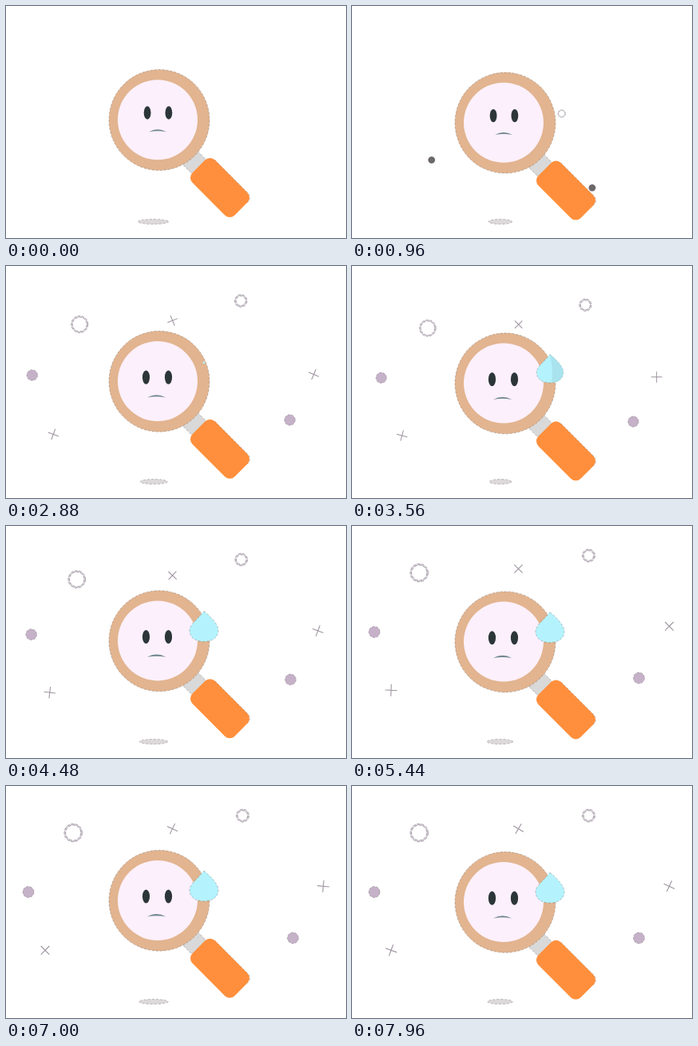
An HTML page for the animation above (8000 ms loop, 426 px wide and 290 px high).

```html
<!DOCTYPE html>
<html lang="en">
<head>
<meta charset="utf-8">
<title>Worried magnifier</title>
<style>
  html, body { margin: 0; width: 100%; height: 100%; overflow: hidden; background: #fff; }
  svg { display: block; width: 426px; height: 290px; }
  .edge { stroke: #4a4446; stroke-width: .5; stroke-opacity: .6; stroke-dasharray: 3 2; }
  .ring { fill: none; stroke: #e6dfe8; stroke-width: 1.6; }
  .rim { fill: none; stroke: #6a616d; stroke-width: .6; stroke-dasharray: 4 1.5; }
  .cross { fill: none; stroke: #9d949f; stroke-width: 1.1; }
</style>
</head>
<body>
<svg viewBox="0 0 426 290">
  <ellipse id="shadow" class="edge" cy="269.6" ry="3.1" fill="#ddd8da"/>
  <g id="bits"></g>
  <g id="glass">
    <g transform="translate(268 227) rotate(45)">
      <rect x="-62" y="-12.5" width="32" height="25" fill="#d9d9d9"/>
      <path class="edge" d="M-62 -12.5H-30M-62 12.5H-30"/>
      <rect x="-37.5" y="-20" width="75" height="40" rx="8.8" fill="#ff8f3c"/>
      <path class="edge" d="M-29 -20H29Q37.5 -20 37.5 -11" fill="none"/>
    </g>
    <circle class="edge" cx="192" cy="142.5" r="63" fill="#e2b48f"/>
    <circle cx="190" cy="142.2" r="50" fill="#fcf0fc"/>
    <g id="eyes" fill="#2c3639">
      <ellipse cx="-13.4" rx="4.4" ry="8.2"/>
      <ellipse cx="13.4" rx="4.4" ry="8.2"/>
    </g>
    <path id="mouth" d="M-11 1.8Q0 -4.3 11 1.8Q0 -.3 -11 1.8Z" fill="#6f878f"/>
    <g id="drop">
      <path class="edge" d="M0 -13C10 -5 18 4 18 11C18 20 10 25 0 25C-10 25 -18 20 -18 11C-18 4 -8 -3 0 -13Z" fill="#b4f3fd"/>
      <path id="shade" d="M0 -13C10 -5 18 4 18 11C18 20 10 25 2 25C4 13 3 0 0 -13Z" fill="#a5dfea"/>
    </g>
  </g>
</svg>
<script>
const LOOP = 8000;
const ORIGIN = [210.5, 285];
const NS = 'http://www.w3.org/2000/svg';
const $ = id => document.getElementById(id);
const clamp = v => Math.min(1, Math.max(0, v));
const mix = (a, b, p) => a + (b - a) * p;
const span = (t, a, b) => clamp((t - a) / (b - a));
const smooth = p => p * p * (3 - 2 * p);

// Linear interpolation through [time, value] pairs, held at both ends.
function track(keys, t) {
  if (t <= keys[0][0]) return keys[0][1];
  for (let i = 1; i < keys.length; i++) {
    const [t0, v0] = keys[i - 1], [t1, v1] = keys[i];
    if (t <= t1) return mix(v0, v1, (t - t0) / (t1 - t0));
  }
  return keys[keys.length - 1][1];
}

const EARLY = [[40, 0], [1720, 1.107], [2200, 1.035], [2560, .988], [3440, .949], [5160, 1]];
const LATE = [[960, 0], [1700, 1.112], [2200, 1.028], [2560, .952], [3440, .909], [5160, 1]];
const SPIN_TIMES = [0, 2200, 3560, 5440, 7000, 7960];
const spin = (...angles) => angles.map((a, i) => [SPIN_TIMES[i], a]);

const bits = [
  { kind: 'dot', x: 28, y: 132.5, r: 7, path: EARLY },
  { kind: 'dot', x: 359.5, y: 190, r: 7, path: EARLY },
  { kind: 'ring', x: 296.5, y: 37, r: 7.1, path: EARLY },
  { kind: 'ring', x: 84.2, y: 58.5, r: 10.4, path: LATE },
  { kind: 'cross', x: 208.5, y: 53.5, r: 7.3, path: LATE, turn: spin(-220, 0, 135, 315, 475, 570) },
  { kind: 'cross', x: 397.5, y: 125.3, r: 7.5, path: LATE, turn: spin(-175, 45, 180, 405, 545, 655) },
  { kind: 'cross', x: 49, y: 205.3, r: 7.5, path: LATE, turn: spin(-205, 25, 195, 362, 495, 560) }
];

function add(parent, tag, attrs) {
  const el = document.createElementNS(NS, tag);
  for (const name in attrs) el.setAttribute(name, attrs[name]);
  return parent.appendChild(el);
}

for (const bit of bits) {
  const { kind, r } = bit;
  bit.el = add($('bits'), 'g', {});
  if (kind === 'dot') {
    bit.fill = add(bit.el, 'circle', { r, class: 'edge' });
  } else if (kind === 'ring') {
    add(bit.el, 'circle', { r, class: 'ring' });
    add(bit.el, 'circle', { r: r + .8, class: 'rim' });
    add(bit.el, 'circle', { r: r - .8, class: 'rim' });
  } else {
    add(bit.el, 'path', { d: `M${-r} 0H${r}M0 ${-r}V${r}`, class: 'cross' });
  }
}

function place(el, x, y, sx = 1, sy = sx, angle = 0) {
  el.setAttribute('transform', `translate(${x} ${y}) rotate(${angle}) scale(${sx} ${sy})`);
}

function draw(t) {
  const phase = t % 2400 / 1200;
  const low = phase < 1 ? phase : 2 - phase;
  place($('glass'), 0, 4.5 * low);
  $('shadow').setAttribute('cx', mix(184.6, 186.1, low));
  $('shadow').setAttribute('rx', mix(19.3, 13.7, low));

  const sag = smooth(span(t, 1900, 2560));
  const blink = 1 - .28 * Math.sin(Math.PI * span(t, 1950, 2500));
  const widen = mix(1, 1.045, sag);
  place($('eyes'), mix(190.5, 189.5, sag), mix(133.5, 137.3, sag), widen, blink * widen);
  place($('mouth'), mix(190, 188.6, sag), mix(155.6, 160.7, sag), mix(1, 1.06, sag));

  const grow = smooth(span(t, 2700, 3720));
  place($('drop'), 248, 118.3, grow);
  $('shade').setAttribute('opacity', .8 * (1 - span(t, 3600, 4200)));

  for (const bit of bits) {
    const k = track(bit.path, t);
    bit.el.style.display = k > .06 ? '' : 'none';
    place(bit.el, mix(ORIGIN[0], bit.x, k), mix(ORIGIN[1], bit.y, k),
      k, k, bit.turn ? track(bit.turn, t) : 0);
    if (bit.fill) {
      const p = span(k, .65, .95);
      bit.fill.setAttribute('fill', `rgb(${mix(108, 197, p)},${mix(103, 177, p)},${mix(107, 200, p)})`);
    }
  }
}

const start = performance.now();
function tick() {
  draw((performance.now() - start) % LOOP);
  requestAnimationFrame(tick);
}
tick();
</script>
</body>
</html>
```
